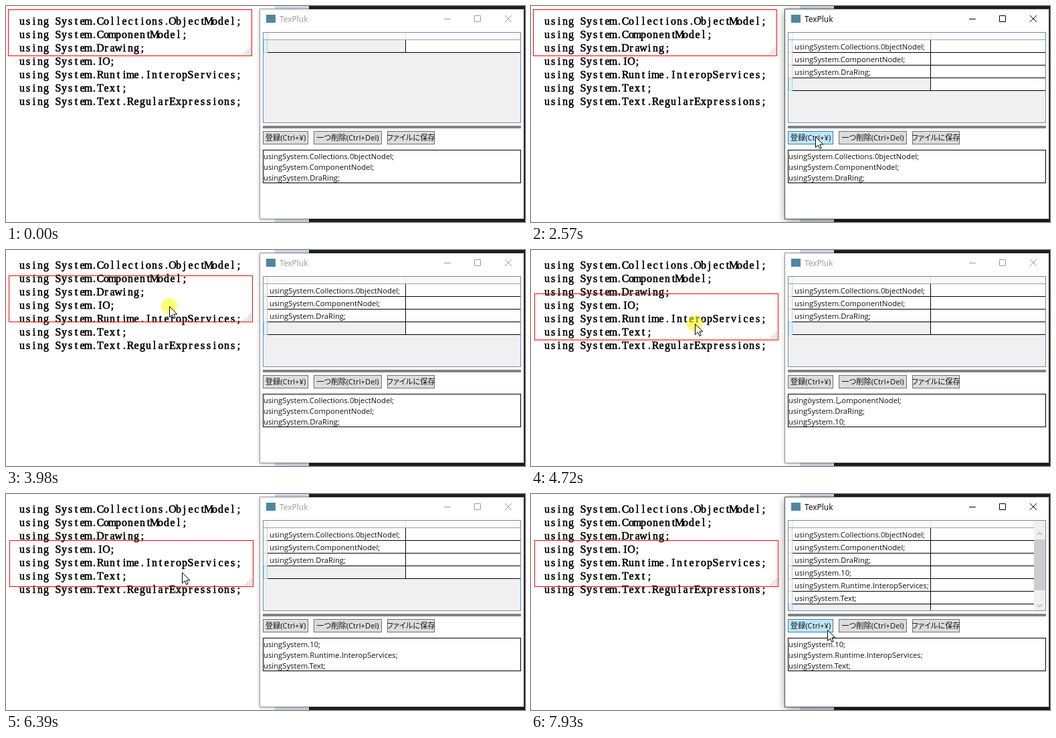
An HTML page for the animation above (8 s loop, 776 px wide and 323 px high).

```html
<!DOCTYPE html>
<html lang="ja">
<meta charset="utf-8">
<title>TexPluk</title>
<style>
  html, body { margin: 0; width: 100%; height: 100%; overflow: hidden; background: #fff; }
  svg { display: block; }
  text { white-space: pre; }
  .ui { font: 11.27px "Open Sans", "Noto Sans CJK JP", "Noto Sans CJK", sans-serif; font-feature-settings: "palt"; fill: #111; }
  .code { font: 16px "Liberation Serif", serif; text-anchor: middle; stroke: #000; stroke-width: .6; }
  .button rect { fill: #ddd; stroke: #707070; }
  .button text { text-anchor: middle; }
  .button.hover rect { fill: #bee6fd; stroke: #3c7fb1; }
  .button.down rect { fill: #c4e5f6; stroke: #2c628b; }
  #win { --ink: #999; --edge: #5558; }
  #win.active { --ink: #000; --edge: #555; }
  #frame { fill: #fff; filter: drop-shadow(0 1px 3px #0005); }
  .active #frame { filter: drop-shadow(0 2px 6px #0008); }
  #border { fill: none; stroke: var(--edge); }
  #title { font-size: 12px; fill: var(--ink); }
  #caption { fill: none; stroke: var(--ink); }
</style>
<svg width="776" height="323" viewBox="0 0 776 323">
  <rect width="776" height="323" fill="#fff"/>
  <rect x="402" width="51" height="323" fill="#d6dbe9"/>
  <rect x="453" width="323" height="323" fill="#1e1e22"/>
  <g id="code" class="code"></g>
  <g id="win">
    <rect id="frame" x="380" y="5" width="394" height="313"/>
    <rect id="border" x="379.5" y="4.5" width="395" height="314"/>
    <rect x="389" y="13" width="14" height="12" fill="#4f87a0"/>
    <text id="title" class="ui" x="409" y="24">TexPluk</text>
    <path id="caption" d="M655 19.5h10M700.5 14.5h9v9h-9zM746 14l10 10m0-10l-10 10"/>
    <rect x="384.5" y="39.5" width="385" height="135" fill="#f0f0f0" stroke="#688caf"/>
    <clipPath id="gridClip"><rect x="385" y="40" width="384" height="134"/></clipPath>
    <g id="grid" class="ui" clip-path="url(#gridClip)"></g>
    <rect x="384" y="179" width="386" height="4" fill="#828282"/>
    <g id="buttons" class="ui"></g>
    <rect x="384.5" y="215.5" width="385" height="49" fill="#fff" stroke="#000"/>
    <g id="result" class="ui"></g>
  </g>
  <g id="area">
    <rect x=".5" y=".5" width="364" height="69" fill="none" stroke="#f00"/>
    <g id="grip"></g>
  </g>
  <g id="cursor">
    <circle id="press" r="12" fill="#ff0" fill-opacity=".55"/>
    <path d="M.5 .5V16.5L4.3 13L6.8 18.5L9.2 17.5L6.8 12H11.8Z" fill="#fff" stroke="#000"/>
  </g>
</svg>
<script>
const PERIOD = 8000;
const $ = id => document.getElementById(id);
const rect = (x, y, w, h, fill) => `<rect x="${x}" y="${y}" width="${w}" height="${h}" fill="${fill}"/>`;
const label = (x, y, text) => `<text x="${x}" y="${y}">${text}</text>`;

const code = ["Collections.ObjectModel", "ComponentModel", "Drawing", "IO",
  "Runtime.InteropServices", "Text", "Text.RegularExpressions"].map(s => `using System.${s};`);
const using = s => `usingSystem.${s};`;
const first = ["Collections.0bjectNodel", "ComponentNodel", "DraRing"].map(using);
const second = ["10", "Runtime.InteropServices", "Text"].map(using);
const partial = ["uslngöystem.しomponentNodel;", first[2], second[0]];

// Each key is [time, x, y].
const pointer = [
  [200, 437, 318], [970, 426, 196], [2500, 426, 196], [2570, 425, 195], [3330, 243, 49],
  [6180, 245, 113], [6250, 246, 113], [6390, 263, 117], [7010, 449, 208], [7120, 449, 208],
  [7190, 447, 206], [7270, 444, 203], [7929, 444, 203], [7930, 443, 203]];
const drag = [
  [3530, 0, 0], [3700, 0, 9], [3980, 1, 33], [4310, 2, 55], [4390, 2, 55],
  [4720, 2, 60.4], [4860, 2, 63], [5119, 2, 63], [5120, 2, 64]];

const linear = u => u;
const smooth = u => u * u * (3 - 2 * u);

function along(keys, t, ease) {
  const i = keys.findIndex(k => k[0] > t);
  if (i < 0) return keys.at(-1).slice(1);
  if (i === 0) return keys[0].slice(1);
  const [a, b] = [keys[i - 1], keys[i]];
  const e = ease((t - a[0]) / (b[0] - a[0]));
  return [1, 2].map(n => Math.round(a[n] + (b[n] - a[n]) * e));
}

const within = (t, ...spans) => spans.some(([a, b]) => t >= a && t < b);

function gridMarkup(rows) {
  const top = 50, pitch = 19;
  const scroll = rows.length > 5;
  const right = scroll ? 752 : 769;
  const last = top + rows.length * pitch;
  let s = rect(385, 40, 384, 10, "#fafafa") + rect(385, top, 384, 1, "#a0a0a0") +
    rect(390, 40, 1, 10, "#ddd") + rect(597, 40, 1, 10, "#ddd");
  for (let i = 0; i <= rows.length; i++) {
    const y = top + i * pitch, isNew = i === rows.length;
    s += rect(385, y + 1, 5, 18, isNew ? "#e3f4fb" : "#fafafa") + rect(385, y + pitch, 5, 1, "#c9caca") +
      rect(390, y + 1, 1, pitch, isNew ? "#9bd0e8" : "#c9caca") +
      rect(391, y + 1, 206, 18, isNew ? "#f0f0f0" : "#fff") +
      rect(598, y + 1, right - 598, 18, "#fff") +
      rect(391, y + pitch, right - 391, 1, "#000");
    if (!isNew) s += label(394, y + 15, rows[i]);
  }
  s += rect(385, last + 1, 1, 18, "#9bd0e8") + rect(597, top + 1, 1, last + pitch - top, "#000");
  if (scroll) s += rect(752, 40, 17, 134, "#f0f0f0") + rect(752, 68, 17, 76, "#cdcdcd") +
    `<path d="M757 61l3.5-3.5 3.5 3.5M757 165l3.5 3.5 3.5-3.5" fill="none" stroke="#b0b0b0" stroke-width="1.3"/>`;
  return s;
}

const cache = {};
function setMarkup(id, markup) {
  if (cache[id] !== markup) $(id).innerHTML = cache[id] = markup;
}

$("code").innerHTML = code.map((line, row) =>
  label([...line].map((_, i) => 24 + 9 * i).join(" "), 28 + 20 * row, line)).join("");
$("buttons").innerHTML = [[384, 68, "登録(Ctrl+¥)"], [460, 102, "一つ削除(Ctrl+Del)"], [570, 71, "ファイルに保存"]]
  .map(([x, w, s]) => `<g class="button"><rect x="${x + .5}" y="187.5" width="${w - 1}" height="19"/>` +
    label(x + w / 2, 201, s) + "</g>").join("");
let dots = "";
for (let r = 0; r < 4; r++)
  for (let c = 0; c <= r; c++) dots += rect(361 - 3 * c, 57 + 3 * r, 2, 2, "#ccc");
$("grip").innerHTML = dots;
const register = document.querySelector(".button");

function draw(t) {
  const dragging = t >= 3530 && t < 5990;
  const [dx, dy] = along(drag, t, linear);
  let [x, y] = along(pointer, t, smooth);
  if (t >= 3330 && t < 6180) {
    // The dragged area trails the pointer slightly.
    const lead = along(drag, t + 30, linear);
    [x, y] = [243 + lead[0], 49 + lead[1]];
  }
  const clicking = within(t, [1700, 1830], [7440, 7670]);
  const hover = t >= 200 && x >= 384 && x < 452 && y >= 187 && y < 207;

  $("cursor").setAttribute("transform", `translate(${x} ${y})`);
  $("cursor").style.display = t < 200 ? "none" : "";
  $("press").style.display = dragging || clicking ? "" : "none";
  $("area").setAttribute("transform", `translate(${3 + dx} ${5 + dy})`);
  $("win").setAttribute("class", within(t, [1700, 3530], [7440, PERIOD]) ? "active" : "");
  register.setAttribute("class", "button" + (hover ? " hover" : "") + (clicking ? " down" : ""));

  const rows = t < 1830 ? [] : t < 7600 ? first : [...first, ...second];
  const lines = t < 4200 ? first : t < 5530 ? partial : second;
  setMarkup("grid", gridMarkup(rows));
  setMarkup("result", lines.map((s, i) => label(385, 229 + 16 * i, s)).join(""));
}

function tick() {
  draw(performance.now() % PERIOD);
  requestAnimationFrame(tick);
}
tick();
</script>
</html>
```
